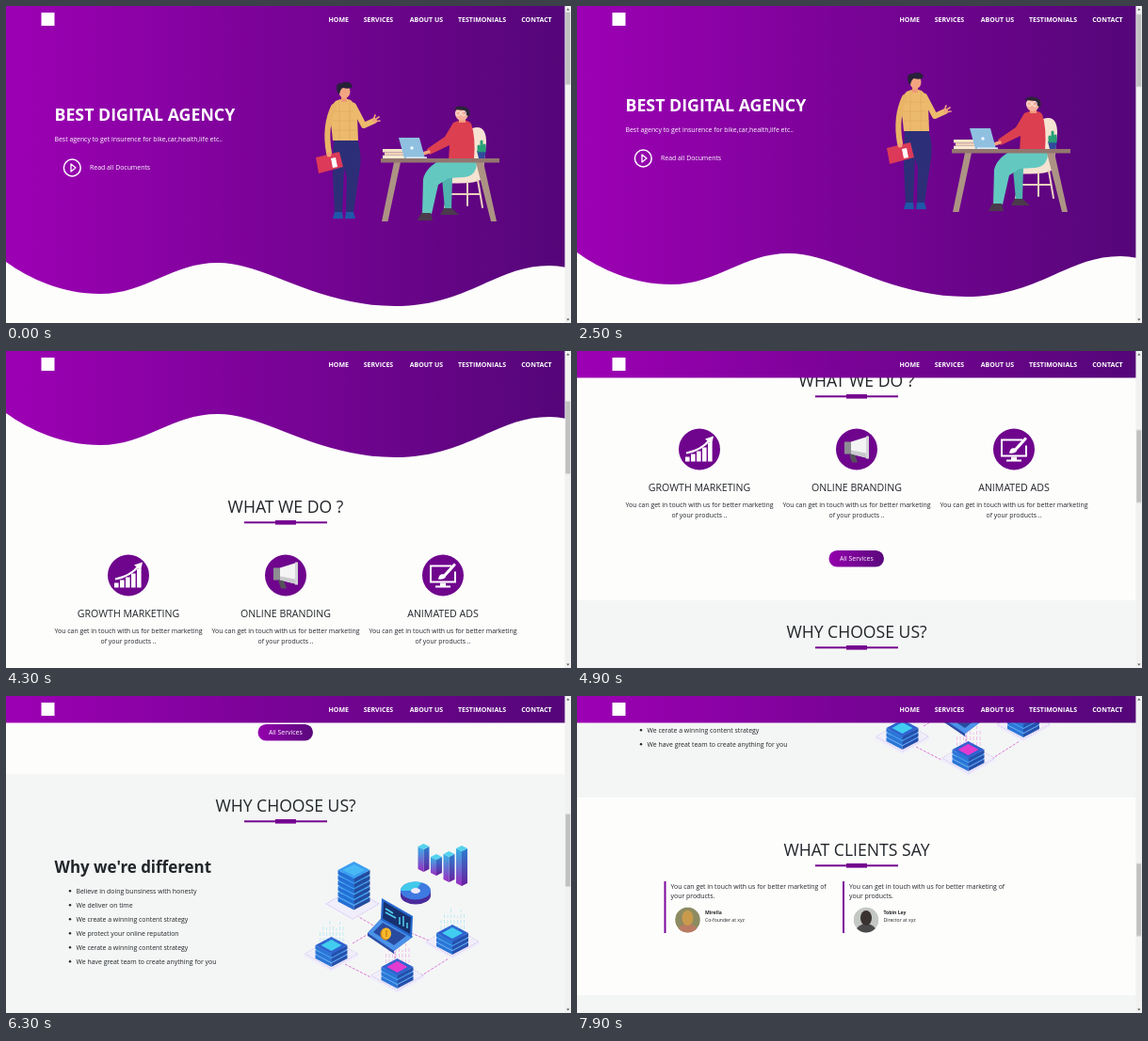
Write an HTML page that moves like this. It is 600 px wide and 337 px high and loops after 8 s.

```html
<!DOCTYPE html>
<html lang="en">
<head>
<meta charset="utf-8">
<title>Digital agency page</title>
<style>
  html, body { margin: 0; width: 100%; height: 100%; overflow: hidden; background: #fdfdfc; }
  svg { display: block; width: 600px; height: 337px; }
  text { font-family: "Open Sans", "Noto Sans", sans-serif; font-size: 6.92px; fill: #212529; }
  .light { fill: #fff; }
  .mid { text-anchor: middle; }
  .nav { font-size: 7px; font-weight: 700; fill: #fff; }
  .hero { font-size: 17.75px; font-weight: 700; fill: #fff; }
  .title { font-size: 17.6px; font-weight: 500; text-anchor: middle; }
  .card { font-size: 10.6px; font-weight: 500; text-anchor: middle; }
  .why { font-size: 16.95px; font-weight: 700; }
  .name { font-size: 5.1px; font-weight: 700; }
  .role { font-size: 5.1px; }
</style>
</head>
<body>
<svg id="stage" viewBox="0 0 600 337"></svg>
<script>
const LOOP = 8000;
// Scroll runs: start time, then one position every 100 ms.
const RUNS = [
  [0, 0],
  [2500, 10, 30, 49, 60, 65],
  [3200, 70, 84, 102, 114, 123, 129, 131],
  [4000, 140, 157, 181, 206, 233, 263, 293, 316, 327],
  [4900, 340, 358, 376, 388, 393],
  [5600, 403, 425, 454, 487, 510, 521],
  [6300, 522],
  [6500, 537, 560, 580, 589],
  [7100, 607, 641, 680, 708, 720],
  [7800, 730, 753]
];

const text = (x, y, s, cls = '') => `<text x="${x}" y="${y}" class="${cls}">${s}</text>`;
const rect = (x, y, w, h, fill, more = '') =>
  `<rect x="${x}" y="${y}" width="${w}" height="${h}" fill="${fill}" ${more}/>`;
const path = (d, fill) => `<path d="${d}" fill="${fill}"/>`;
const stroke = (d, color, w = 1, more = '') =>
  `<path d="${d}" fill="none" stroke="${color}" stroke-width="${w}" ${more}/>`;
const disc = (x, y, r, fill) => `<circle cx="${x}" cy="${y}" r="${r}" fill="${fill}"/>`;
const oval = (x, y, rx, ry, fill) => `<ellipse cx="${x}" cy="${y}" rx="${rx}" ry="${ry}" fill="${fill}"/>`;
const group = (x, y, s) => `<g transform="translate(${x} ${y})">${s}</g>`;
const round = 'stroke-linecap="round" stroke-linejoin="round"';

const title = (y, s) => text(297, y + 6.2, s, 'title') +
  rect(253, y + 15.3, 88, 2, '#74048f') + rect(286, y + 14, 22, 4.6, '#74048f');

// Isometric parts
const tile = (x, y, w, h) => `M${x} ${y - h}l${w} ${h}l${-w} ${h}l${-w} ${-h}z`;
const block = (x, y, w, h, d, top, left, right) =>
  path(`M${x - w} ${y}l${w} ${h}v${d}l${-w} ${-h}z`, left) +
  path(`M${x + w} ${y}l${-w} ${h}v${d}l${w} ${-h}z`, right) +
  path(tile(x, y, w, h), top);

function hero() {
  const man =
    path('M348 141H373Q379 160 375 178L369 220H361L362 182L359 172L357 220H349L347 180Z', '#2c2f78') +
    path('M349 219L357 219L358 226L347 226ZM361 219L369 219L371 226L360 226Z', '#1f58a8') +
    path('M350 101Q358 97 366 100Q372 104 373 118L374 143L347 143Q346 130 344 120Q344 106 350 101Z', '#ecba6c') +
    stroke('M346 112H372M346 122H373M347 132H374M354 100V143M365 100V143', '#d9a35c', .5) +
    stroke('M348 107Q338 128 343 156', '#e9b467', 6, round) +
    stroke('M369 106L380 127L391 122', '#ecba6c', 6, round) +
    stroke('M390 122L396 118M391 123L397 122M390 121L392 116', '#f2a07c', 1.7, round) +
    rect(356, 94, 6, 8, '#ee9877') + oval(359.5, 91, 6, 7, '#f2a481') +
    path('M352 92Q349 81 356 82Q366 78 368 86Q364 89 358 87Q355 88 354 94Z', '#27213a') +
    path('M329 161L354 155L358 171L332 178Z', '#dc3a58') +
    path('M345 162L350 161L352 171L347 172Z', '#fff') +
    disc(343, 158, 2.5, '#f2a07c');
  const chair =
    path('M495 130Q510 125 510 145L506 184Q496 190 466 188L465 181L491 180Z', '#f6e3d2') +
    stroke('M473 186L466 214M501 185L506 214M490 187V212M470 200H503', '#ecd0be', 2, round);
  const sitter =
    path('M463 184L474 182L473 216H466Z', '#4fb3ae') +
    path('M463 163H500Q501 181 486 182L470 183L459 190L452 221L442 221L443 184Q446 171 463 163Z', '#63c9c0') +
    path('M441 220H451L453 228L437 228ZM465 215H473L481 222L461 222Z', '#4b3a4c') +
    path('M475 124Q487 118 494 125Q499 140 497 163L470 164L471 148L450 158L447 152L466 139Z', '#dc3f50') +
    stroke('M449 155L440 158', '#f2a07c', 3.5, round) +
    rect(481, 116, 7, 8, '#ee9877') + oval(484, 114.5, 7, 7.5, '#f5b09c') +
    path('M476 110Q478 105 487 107Q495 110 492 118L488 115L487 111Z', '#2b2438') +
    `<g fill="none" stroke="#fbecec" stroke-width=".9"><circle cx="480" cy="114" r="2.5"/><circle cx="486" cy="114" r="2.5"/></g>`;
  const desk =
    path('M412 166H419L405.5 229H399ZM499 166H507L521 229H515Z', '#ad9384') +
    rect(398, 162, 126, 4.5, '#93766f') +
    rect(400, 152, 27, 3.5, '#f5e4c4') + rect(402, 155.5, 25, 3.2, '#ecd5b6') + rect(400, 158.7, 28, 3.3, '#f7ead2') +
    path('M417 140L439 140L445 162L423 162Z', '#90c0e0') + rect(425, 160.4, 22, 1.6, '#d9e9f7') +
    disc(431, 151, 1.7, '#eef6ff') +
    path('M500 154H510L508 162H502Z', '#314a9e') +
    stroke('M505 154V144M502 154V149M508 154V148', '#27a076', 3, round);
  return rect(0, 0, 594, 330, 'url(#brand)') +
    text(51.5, 122.3, 'BEST DIGITAL AGENCY', 'hero') +
    text(51.5, 143.7, 'Best agency to get insurence for bike,car,health,life etc..', 'light') +
    text(89, 173.6, 'Read all Documents', 'light') +
    `<circle cx="70.3" cy="172" r="8.9" fill="none" stroke="#fff" stroke-width="1.5"/>` +
    stroke('M69 168V176L74 172Z', '#fff', 1.3, round) +
    man + chair + sitter + desk +
    path('M0 272C25 290 60 306 100 306C150 306 175 273 225 273C275 273 330 319 413 319' +
      'C490 319 520 276 577 276Q586 276 594 277.7V340H0Z', '#fdfdfc');
}

function services() {
  const chart = [5, 8, 11, 15, 20].map((h, i) => rect(-15 + i * 6, 13 - h, 4.6, h, '#fff')).join('') +
    stroke('M-14 4Q2 1 11 -10', '#fff', 2) + path('M6 -11L15 -14L13 -5Z', '#fff');
  const horn = path('M-13 -8H-6V5H-13Z', '#8d8d92') + path('M-6 -8L10 -13V9L-6 5Z', '#f4f4f4') +
    path('M-8 5H-2L1 14H-5Z', '#55505c') + rect(10, -14, 3, 24, '#d4d4d8') + path('M-6 1L10 4V9L-6 5Z', '#c9c9ce');
  const screen = stroke('M9 -10H-13V7H13V-4', '#fff', 2) + rect(-3, 8, 6, 4, '#fff') + rect(-8, 11, 16, 2, '#fff') +
    stroke('M1 1L12 -11', '#fff', 3.2, round) + path('M-5 4Q-4 -2 1 -1L3 2Q0 5 -5 4Z', '#fff');
  const cards = [['GROWTH MARKETING', chart], ['ONLINE BRANDING', horn], ['ANIMATED ADS', screen]];
  return title(372, 'WHAT WE DO ?') + cards.map(([name, icon], i) => {
    const x = 130 + i * 167;
    return group(x, 444.5, disc(0, 0, 22, '#6f058d') + icon) +
      text(x, 489, name, 'card') +
      text(x, 505.6, 'You can get in touch with us for better marketing', 'mid') +
      text(x, 516.5, 'of your products ..', 'mid');
  }).join('') +
    rect(267.5, 552, 58.5, 17.5, 'url(#pill)', 'rx="8.7"') +
    text(296.8, 563.2, 'All Services', 'light mid');
}

function pad(x, y, top) {
  let s = path(tile(x, y + 6, 30, 17), '#f1eefb') +
    stroke(tile(x, y + 4, 28, 16), '#c9b6ee', .7, 'stroke-dasharray="2 1"');
  for (let i = 2; i >= 0; i--) s += block(x, y - 5 + i * 5, 17, 9, 4, i ? '#4aa0ee' : '#2f62d0', '#2b76d6', '#2550ad');
  s += path(tile(x, y - 5, 11, 6), top);
  for (let i = 0; i < 8; i++) {
    const h = 12 + (i * 7) % 11;
    s += stroke(`M${x - 12 + i * 3.5} ${y - 9}v${-h}`, top, .7, 'opacity=".4" stroke-dasharray="4 2"');
  }
  return s;
}

function diagram() {
  let s = stroke('M368 146L392 160M368 178L388 166M430 167L452 176M413 187V200M360 200L391 216M440 213L470 194',
    '#d45bd0', .8, 'stroke-dasharray="3 1.5"');
  s += path(tile(368, 136, 30, 17), '#f1eefb') + stroke(tile(368, 136, 28, 16), '#c9b6ee', .7, 'stroke-dasharray="2 1"');
  for (let i = 5; i >= 0; i--) s += block(369.5, 100 + i * 5.8, 17, 9, 4.4, '#3b9df0', '#246fd4', '#224c9f');
  s += path(tile(369.5, 100, 12, 6), '#48b8f5');
  [[443.5, 75, 24], [457, 86, 17], [470.5, 83, 27], [484, 77, 37]].forEach(([x, y, h]) => {
    s += block(x, y, 6, 3, h, '#54d3ee', 'url(#bar)', 'url(#bar2)');
  });
  s += oval(435, 127, 16, 9.5, '#4b2a9b') + rect(419, 122, 32, 5, '#4b2a9b') + oval(435, 122, 16, 9.5, '#3f7ae0') +
    path('M435 122L419 122A16 9.5 0 0 1 441 113.2Z', '#42c9ea') + oval(435, 122, 5, 3, '#efeafa');
  s += pad(345.5, 185, '#41cdf0') + pad(474, 172, '#41cdf0') + pad(415.5, 208, '#e33bd0');
  s += path('M384 167L398 152L432 171L412 186V189L384 170Z', '#2b4da6') + path('M384 167L398 152L432 171L412 186Z', '#4b93ea') +
    path('M390 166L400 156L425 170L412 180Z', '#294b9f') +
    path('M399 130L432 149L431 172L398 153Z', '#2468cf') + path('M401 133.5L430 150.5L429 168L400 151.5Z', '#17316f') +
    stroke('M403 141L411 146M403 145L414 151M418 158V150M422 160V149M426 162V156', '#52d1ec', 1.5) +
    oval(403, 168, 5.5, 6.5, '#d98a15') + oval(404, 167.5, 5, 6, '#f9b92d') + stroke('M404 164V171', '#c9810f', 1.4);
  return `<g clip-path="url(#art)">${s}</g>`;
}

function why() {
  const points = ['Believe in doing bunsiness with honesty', 'We deliver on time', 'We create a winning content strategy',
    'We protect your online reputation', 'We cerate a winning content strategy', 'We have great team to create anything for you'];
  return rect(0, 605, 594, 256, '#f4f6f5') + title(639, 'WHY CHOOSE US?') +
    text(51.5, 709.5, "Why we're different", 'why') +
    points.map((p, i) => disc(68, 729.3 + i * 15, 1.2, '#212529') + text(74.5, 731.6 + i * 15, p)).join('') +
    group(0, 607, diagram());
}

function clients() {
  const people = [
    ['Mirella', 'Co-founder at xyz', '#8d8b62', '#c99a4c', '#b97b62'],
    ['Tobin Ley', 'Director at xyz', '#c4c8c4', '#3a3230', '#4b4a4b']
  ];
  return title(917, 'WHAT CLIENTS SAY') + people.map(([name, role, back, head, body], i) =>
    group(i * 189.5, 0,
      rect(92.5, 950, 2, 55, '#7d0799') +
      text(99.5, 957.8, 'You can get in touch with us for better marketing of') +
      text(99.5, 968.4, 'your products.') +
      group(117.5, 991, `<g clip-path="url(#face)">${disc(0, 0, 13.4, back) + oval(0, 13, 11, 9, body) + oval(0, -2, 6, 8, head)}</g>`) +
      text(136, 985, name, 'name') + text(136, 993, role, 'role'))
  ).join('') + rect(0, 1071, 594, 60, '#f4f6f5');
}

function header() {
  const links = [[342.5, 'HOME'], [379.7, 'SERVICES'], [428.7, 'ABOUT US'], [480, 'TESTIMONIALS'], [547.3, 'CONTACT']];
  return rect(0, 0, 594, 28.5, 'url(#brand)') + rect(37.5, 7, 14, 14, '#fff') +
    links.map(([x, s]) => text(x, 17, s, 'nav')).join('');
}

const ramp = (id, a, b, more = '') =>
  `<linearGradient id="${id}" ${more}><stop stop-color="${a}"/><stop offset="1" stop-color="${b}"/></linearGradient>`;
const down = 'x2="0" y2="1"';

document.getElementById('stage').innerHTML =
  '<defs>' +
    ramp('brand', '#9d00b4', '#540678', 'gradientUnits="userSpaceOnUse" x1="0" x2="594"') +
    ramp('pill', '#9400ad', '#5a087c') +
    ramp('bar', '#35b4e6', '#9a2bc0', down) + ramp('bar2', '#2b7fd0', '#6a1fa0', down) +
    '<clipPath id="face"><circle r="13.4"/></clipPath>' +
    '<clipPath id="art"><rect x="310" y="60" width="200" height="172"/></clipPath>' +
  '</defs>' +
  rect(0, 0, 600, 337, '#fdfdfc') +
  `<g id="page">${hero() + services() + why() + clients()}</g>` +
  header() +
  rect(593.4, 0, 6.6, 337, '#f1f1f1') +
  path('M595.2 4.4L596.8 2.4L598.4 4.4ZM595.2 332.6L596.8 334.6L598.4 332.6Z', '#505050') +
  rect(594.2, 6.5, 5, 77, '#c1c1c1', 'id="thumb"');

const steps = RUNS.flatMap(([t, ...ys]) => ys.map((y, i) => [t + i * 100, y]));
steps.push([LOOP, steps[steps.length - 1][1]]);

function scroll(id, rate) {
  document.getElementById(id).animate(
    steps.map(([t, y]) => ({ offset: t / LOOP, transform: `translateY(${y * rate}px)`, easing: 'steps(1, end)' })),
    { duration: LOOP, iterations: Infinity });
}
scroll('page', -1);
scroll('thumb', 0.228);
</script>
</body>
</html>
```
